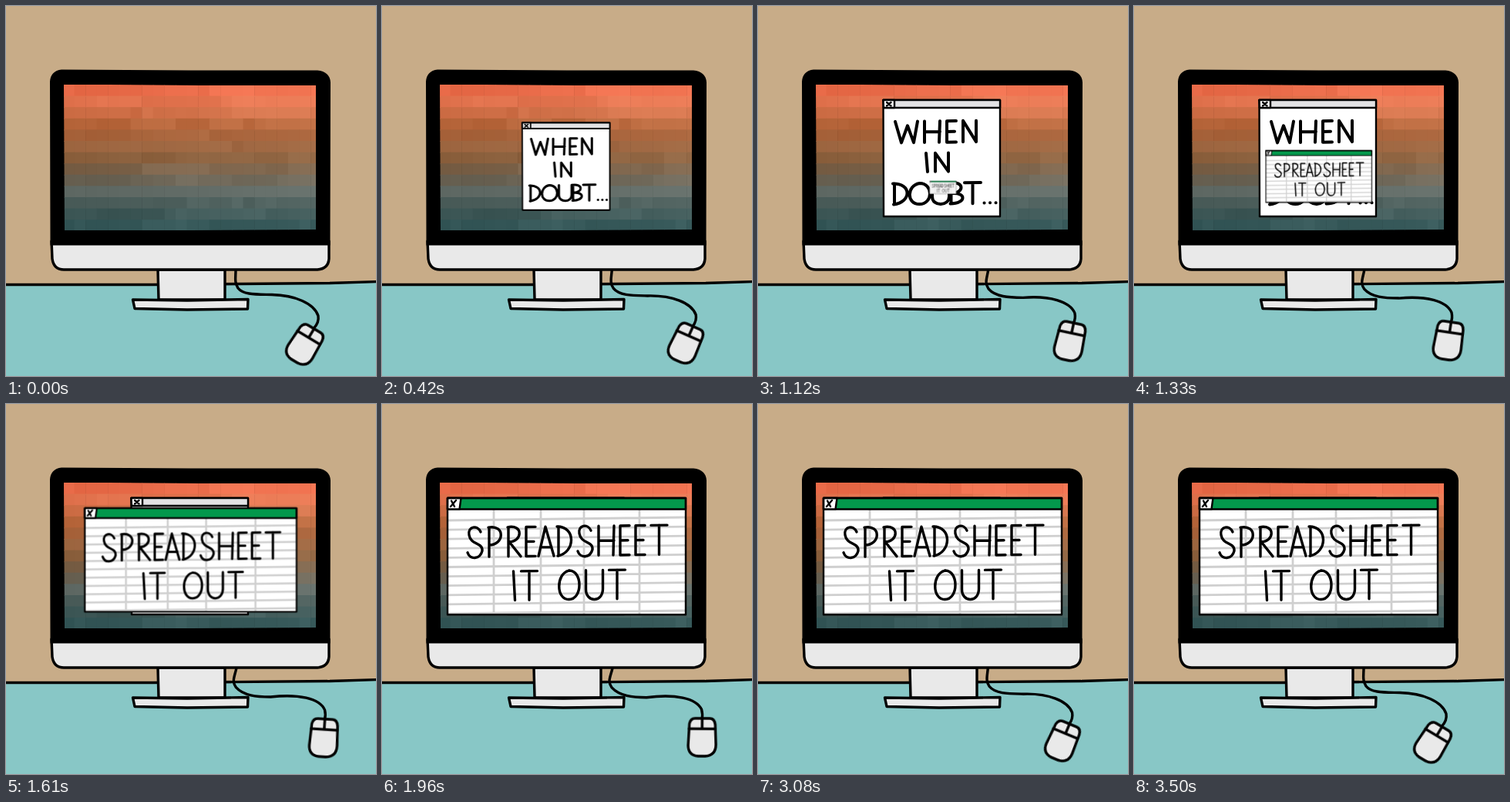
Animation, 480 px wide and 480 px high, one loop 4.27 s. Source, as an HTML page:

```html
<!DOCTYPE html>
<html lang="en">
<head>
<meta charset="utf-8">
<title>When in doubt</title>
<style>
  html, body { margin: 0; width: 100%; height: 100%; overflow: hidden; background: #c8ac88; }
  svg { display: block; width: 100vw; height: 100vh; }
  .ink { stroke: #000; stroke-width: 3.4; stroke-linecap: round; stroke-linejoin: round; }
  .line { fill: none; }
  .thin { stroke-width: 2.4; }
  .bold { stroke-width: 4; }
  .grid { stroke: #cfcfcf; stroke-width: 2.8; stroke-linecap: butt; }

  #note, #sheet, #mouse, #cable { animation: 4270ms -2ms infinite; }
  #note, #sheet { transform-origin: 240px 240px; }
  #note { animation-name: note; }
  #sheet { animation-name: sheet; }
  #mouse { animation-name: mouse; }
  #cable { animation-name: cable; }

  /* Everything advances in 70 ms steps. */
  @keyframes note {
    0% { transform: scale(0); animation-timing-function: steps(8); }
    13.1148%, 100% { transform: scale(1); }
  }
  @keyframes sheet {
    0% { transform: scale(0); }
    24.5902% { transform: scale(0); animation-timing-function: steps(9); }
    39.3443%, 100% { transform: scale(1); }
  }
  @keyframes mouse {
    0%, 81.9672%, 100% { transform: translate(387.3px, 439.3px) rotate(31deg); animation-timing-function: steps(27); }
    44.2623% { transform: translate(416.5px, 431.5px) rotate(-1deg); animation-timing-function: steps(23); }
  }
  @keyframes cable {
    0%, 81.9672%, 100% {
      d: path("M298 343C298 352 296 358 301 366C308 375 325 374 345 374.5C375 375 400 386 405 402C406 408 403 414 399.5 418");
      animation-timing-function: steps(27);
    }
    44.2623% {
      d: path("M299 343C296 355 292 360 298 368C308 379 325 381 343 381C380 376 408 381 415 396C416 400 416.5 404 416 407");
      animation-timing-function: steps(23);
    }
  }
</style>
</head>
<body>
<svg viewBox="0 0 480 480">
  <clipPath id="glass"><path d="M75 101.500L250 103L402 103V290L240 291H76Z"/></clipPath>

  <rect width="480" height="480" fill="#c8ac88"/>
  <path class="ink" fill="#88c7c6" stroke-width="3" d="M-4 361.500L190 361.500L420 359.500L484 357.500V490H-4Z"/>

  <g class="ink" fill="#e9e9e9">
    <path d="M197 342L198 381H284V342Z"/>
    <path d="M164.500 381L235 382L314 380.500L313.500 393L235 394L167 392.500Z"/>
    <path id="cable" class="line"/>
    <path d="M59 305L60 328Q62 342 75 342H404Q418 341 419 328V305Z"/>
  </g>
  <path d="M57 98Q58 84 72 82.500L240 83.500L404 83.500Q420 85 421 99L420.500 310.500H57.500Z"/>
  <g id="pixels" clip-path="url(#glass)"></g>

  <g id="note" class="ink">
    <path class="thin" fill="#fff" d="M162.500 122H314V273H163Z"/>
    <path class="thin" fill="#e2e2e4" d="M162.500 122H314V132H163Z"/>
    <path class="thin" fill="#fff" d="M162.500 122H177V132H163Z"/>
    <path class="line thin" d="M167 125L172.500 129.500M172.500 125L167 129.500"/>
  </g>

  <g id="sheet" class="ink">
    <path fill="#fff" stroke="none" d="M85 122H394V273H85Z"/>
    <path id="lines" class="line grid"/>
    <path class="thin" fill="#03984c" d="M85 122H394V136.500H85Z"/>
    <path class="thin" fill="#fff" d="M85 122H102.500L100.500 136.500H85Z"/>
    <path class="line thin" d="M90 125.500L94 133M96 125L89 133"/>
    <path class="line thin" d="M85 122H394V273.300H85Z"/>
  </g>

  <g id="mouse" class="ink">
    <path id="shell" fill="#e9e9e9" d="M-9-24H10Q16-24 17-16L18 10Q18 24 4 25H-5Q-18 24-18 11L-16.500-17Q-15-24-9-24Z"/>
    <path class="line" d="M-17-10.500H17M0-24V-11"/>
  </g>
</svg>
<script>
  const $ = id => document.getElementById(id);

  let seed = 11;
  const rand = () => (seed = seed * 16807 % 2147483647) / 2147483647;
  const jitter = size => (rand() - 0.5) * size;

  // Hand-lettered capitals: [width, strokes]; heights run from 0 to 10.
  const glyphs = {
    ' ': [12, ''],
    '.': [5, 'M2 9.8L2.1 9.8'],
    A: [14, 'M-4 10L5 0L16 10M0 7L13 7'],
    B: [15, 'M0 0L0 10M-2 0C18 -1 17 5 1 5C20 4.5 20 10 -1 10'],
    D: [17, 'M0 0L0 10M-2 0C23 0 22 9 -1 10'],
    E: [12, 'M12 0L0 0L0 10L12 10M0 5L10 5'],
    H: [20, 'M0 0L0 10M20 0L19 10M0 5L20 5'],
    I: [2, 'M0 0L2 10'],
    N: [17, 'M0 10L0 0L17 10L17 0'],
    O: [27, 'M13 0C-4 1 -4 10 13 10C31 10 31 0 13 0'],
    P: [17, 'M1 0L1 10M0 0C22 -1 21 6 1 6'],
    R: [16, 'M1 0L1 10M0 0C21 -1 19 5 2 5L17 10'],
    S: [19, 'M17 1.5C13 -1 0 -0.5 2 2.5C4 6 20 5 19 8C16 11 3 11 0 8.5'],
    T: [21, 'M0 0L21 0M10.5 0L10.5 10'],
    U: [22, 'M0 0L0 6.5C0 11.3 22 11.3 22 6.5L22 0'],
    W: [29, 'M0 0L8 10L16 2L24 10L29 0']
  };

  // Letters one line of text, rising slightly to the right.
  function letter(parent, text, left, top, height, gap, weight) {
    let d = '', pen = left;
    for (const ch of text) {
      const [width, strokes] = glyphs[ch];
      d += strokes.replace(/(-?[\d.]+) (-?[\d.]+)/g, (_, x, y) => {
        const px = pen + +x;
        return `${px} ${top + y * height / 10 - (px - left) * 0.013}`;
      });
      pen += width + gap;
    }
    $(parent).insertAdjacentHTML('beforeend',
      `<path class="line ${weight}" role="img" aria-label="${text}" d="${d}"/>`);
  }

  letter('note', 'WHEN', 178, 150, 27.5, 9, 'bold');
  letter('note', 'IN', 218, 191, 24, 10, 'bold');
  letter('note', 'DOUBT...', 177, 230.5, 27, 2.5, 'bold');
  letter('sheet', 'SPREADSHEET', 111, 160.5, 38, 8, '');
  letter('sheet', 'IT OUT', 170.5, 217, 37.5, 8, '');

  // Wallpaper: a sunset in coarse cells, lighter towards the right.
  const sunset = [[244, 118, 84], [189, 108, 65], [145, 102, 67], [97, 107, 102], [52, 86, 87]];
  const cell = 14.6, cols = 23, rowCount = 13;
  let cells = '';
  for (let r = 0; r < rowCount; r++) {
    const i = Math.min(Math.floor(r / 3), 3), mix = r / 3 - i;
    const rowShade = jitter(8);
    let shade = 0;
    for (let c = 0; c < cols; c++) {
      if (rand() < 0.4) shade = jitter(14);
      const light = rowShade + shade + (c / cols - 0.5) * 14;
      const tone = sunset[i].map((v, k) => Math.round(v + (sunset[i + 1][k] - v) * mix + light));
      cells += `<rect x="${74 + c * cell}" y="${102 + r * cell}" width="${cell + 0.5}" height="${cell + 1}" fill="rgb(${tone})"/>`;
    }
  }
  $('pixels').innerHTML = cells;

  let grid = '';
  for (let y = 151; y < 276; y += 12.1) grid += `M85 ${y}L393 ${y - 4}`;
  for (const x of [145, 206, 262, 334]) grid += `M${x} 137V272`;
  $('lines').setAttribute('d', grid);
</script>
</body>
</html>
```
